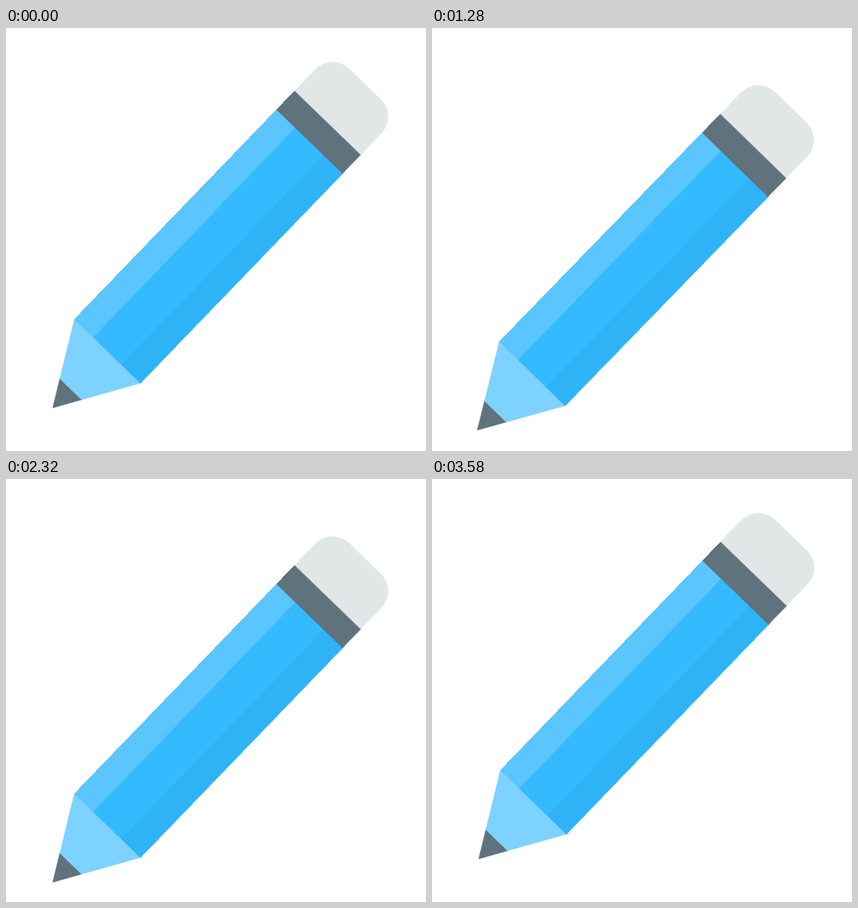
Write an HTML page that moves like this. It is 700 by 704 pixels and loops after 3.6 s.

```html
<!DOCTYPE html>
<html lang="en">
<head>
<meta charset="utf-8">
<title>Pencil</title>
<style>
  html, body { margin: 0; width: 100%; height: 100%; overflow: hidden; background: #fff; }
  svg { display: block; width: 700px; height: 704px; }

  .bob, .sway {
    animation: 3600ms cubic-bezier(.3333, 0, .6667, 1) infinite;
    transform-box: view-box;
  }
  .bob { animation-name: bob; }
  .sway { animation-name: sway; transform-origin: 0 -6px; }

  @keyframes bob {
    0%, 49.72%, 99.44%, 100% { transform: translateY(0); }
    24.86%, 74.58% { transform: translateY(61px); }
  }
  @keyframes sway {
    0%, 32.8%, 64.6%, 99.44%, 100% { transform: rotate(0deg); }
    15%, 46.8%, 80.1% { transform: rotate(2deg); }
  }
</style>
</head>
<body>
<svg viewBox="0 0 700 704">
  <g class="bob">
    <g class="sway">
      <!-- x runs along the pencil, y across it -->
      <g transform="translate(113.6 484.8) rotate(-46)">
        <path fill="#7dd2ff" d="M1 0V153.4H0L-131.5 76.7L0 0Z"/>
        <path fill="#60727c" d="M-131.5 76.7L-88 51.3V102.1Z"/>
        <path fill="#34baff" d="M0 0H486V153.4H0Z"/>
        <path fill="#5ac5ff" d="M0 0H486V43.8H0Z"/>
        <path fill="#2eb3f6" d="M0 108.8H486V153.4H0Z"/>
        <path fill="#e1e7e7" d="M528 0H578.5a40 40 0 0 1 40 40V113.4a40 40 0 0 1-40 40H528Z"/>
        <path fill="#60727c" d="M485 0H528.7V153.4H485Z"/>
      </g>
    </g>
  </g>
</svg>
</body>
</html>
```
